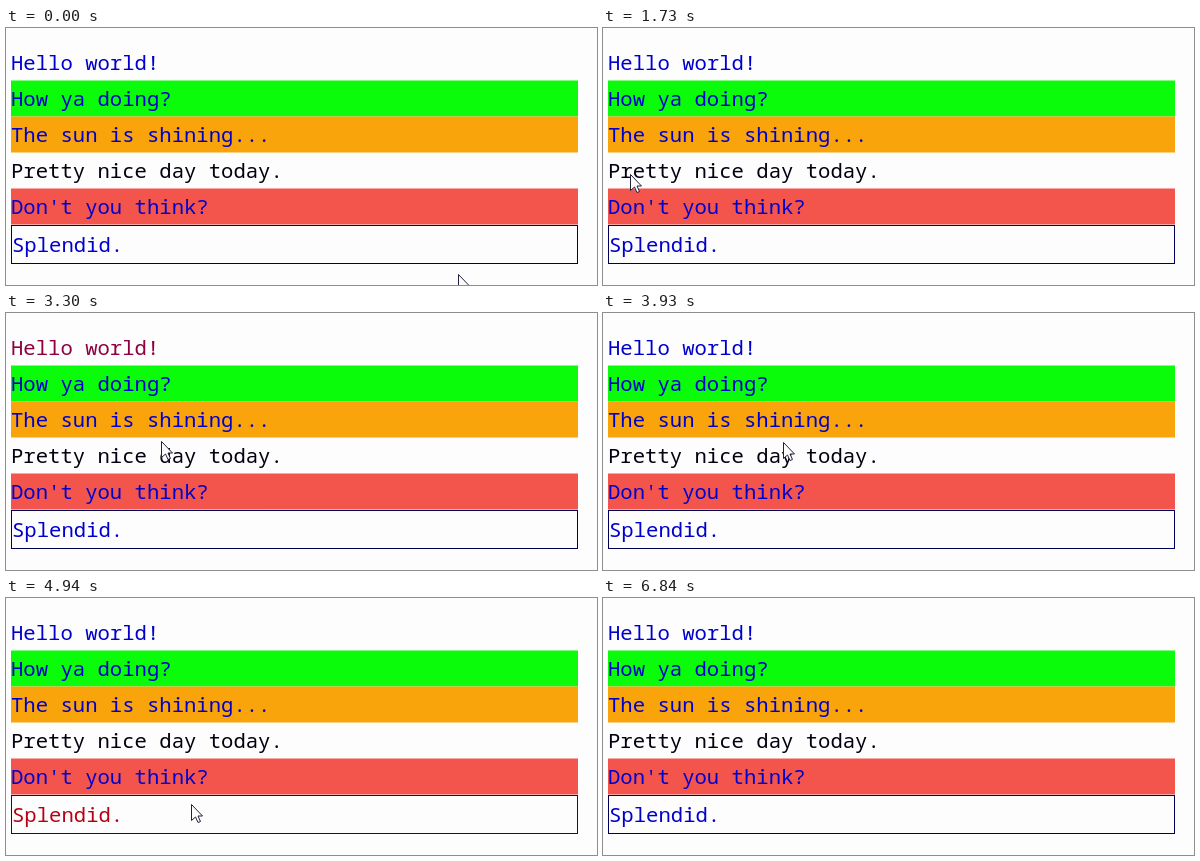
Write an HTML page that moves like this. It is 591 by 257 pixels and loops after 6880 ms.

```html
<!DOCTYPE html>
<html lang="en">
<head>
<meta charset="utf-8">
<style>
  html, body { margin: 0; width: 100%; height: 100%; overflow: hidden; background: #fdfdfd; }
  svg { display: block; }
  text { font: 20.6px "Noto Sans Mono", "DejaVu Sans Mono", monospace; white-space: pre; }
</style>
</head>
<body>
<svg id="stage" width="591" height="257"></svg>
<script>
const LOOP = 6880, STEP = 10, FADE = 1000;
const LEFT = 5, WIDTH = 567, TOP = 16.5, PITCH = 36;
const stage = document.getElementById("stage");

const rows = [
  { text: "Hello world!" },
  { text: "How ya doing?", fill: "#0afc0a" },
  { text: "The sun is shining...", fill: "#f8a40a" },
  { text: "Pretty nice day today.", plain: true },
  { text: "Don't you think?", fill: "#f3554d" },
  { text: "Splendid.", boxed: true }
];

// Where the pointer pauses or turns: time, x, y
const stops = [
  [0, 452, 246], [150, 456, 262],
  [1390, -20, 262], [1480, 10, 215], [1730, 27, 146], [1950, 100, 45],
  [2670, 113, 27], [2830, 120, 40], [3250, 155, 128], [3930, 180, 129],
  [4250, 188, 222], [4940, 185, 206], [5600, 197, -25]
];

const smooth = k => k * k * (3 - 2 * k);
const mix = (a, b, k) => a + (b - a) * k;
const warm = (k, level) => `rgb(${level * k}, 0, ${level * (1 - k)})`;

function add(tag, attrs) {
  const node = document.createElementNS("http://www.w3.org/2000/svg", tag);
  for (const key in attrs) node.setAttribute(key, attrs[key]);
  return stage.appendChild(node);
}

function pointerAt(t) {
  const next = stops.findIndex(stop => stop[0] > t);
  if (next < 0) return stops[stops.length - 1].slice(1);
  const [t0, x0, y0] = stops[next - 1], [t1, x1, y1] = stops[next];
  const k = smooth((t - t0) / (t1 - t0));
  return [mix(x0, x1, k), mix(y0, y1, k)];
}

rows.forEach((row, i) => {
  const top = TOP + i * PITCH;
  if (row.fill) add("rect", { x: LEFT, y: top, width: WIDTH, height: PITCH, fill: row.fill });
  if (row.boxed) {
    row.box = add("rect", { x: LEFT + .5, y: top + 1, width: WIDTH - 1, height: PITCH + 2, fill: "#fdfdfd" });
  }
  const inset = row.boxed ? 1 : 0;
  row.label = add("text", { x: LEFT + inset, y: top + 25.5 + 2 * inset, fill: "#000010" });
  row.label.textContent = row.text;
  row.heat = [];
});

// Each row warms while hovered and cools afterwards
let heat = rows.map(() => 0);
for (let t = 0; t < LOOP; t += STEP) {
  const [x, y] = pointerAt(t);
  const hovered = x < LEFT || y > 236 ? -1 : Math.floor((y - TOP) / PITCH);
  rows.forEach((row, i) => row.heat.push(heat[i]));
  heat = heat.map((h, i) => Math.min(1, Math.max(0, h + (i === hovered ? STEP : -STEP) / FADE)));
}

const pointer = add("path", {
  d: "M.5 .5V16.5L4.5 13L7 18.5L9.5 17.5L7 12H11.5Z",
  fill: "#fdfdfd", stroke: "#202038"
});

function draw(t) {
  for (const row of rows) {
    if (row.plain) continue;
    const k = smooth(row.heat[Math.floor(t / STEP)]);
    row.label.setAttribute("fill", warm(k, 205));
    if (row.box) row.box.setAttribute("stroke", warm(k, 90));
  }
  const [x, y] = pointerAt(t).map(Math.round);
  pointer.setAttribute("transform", `translate(${x} ${y})`);
}

const start = performance.now();
function tick() {
  draw((performance.now() - start) % LOOP);
  requestAnimationFrame(tick);
}
tick();
</script>
</body>
</html>
```
